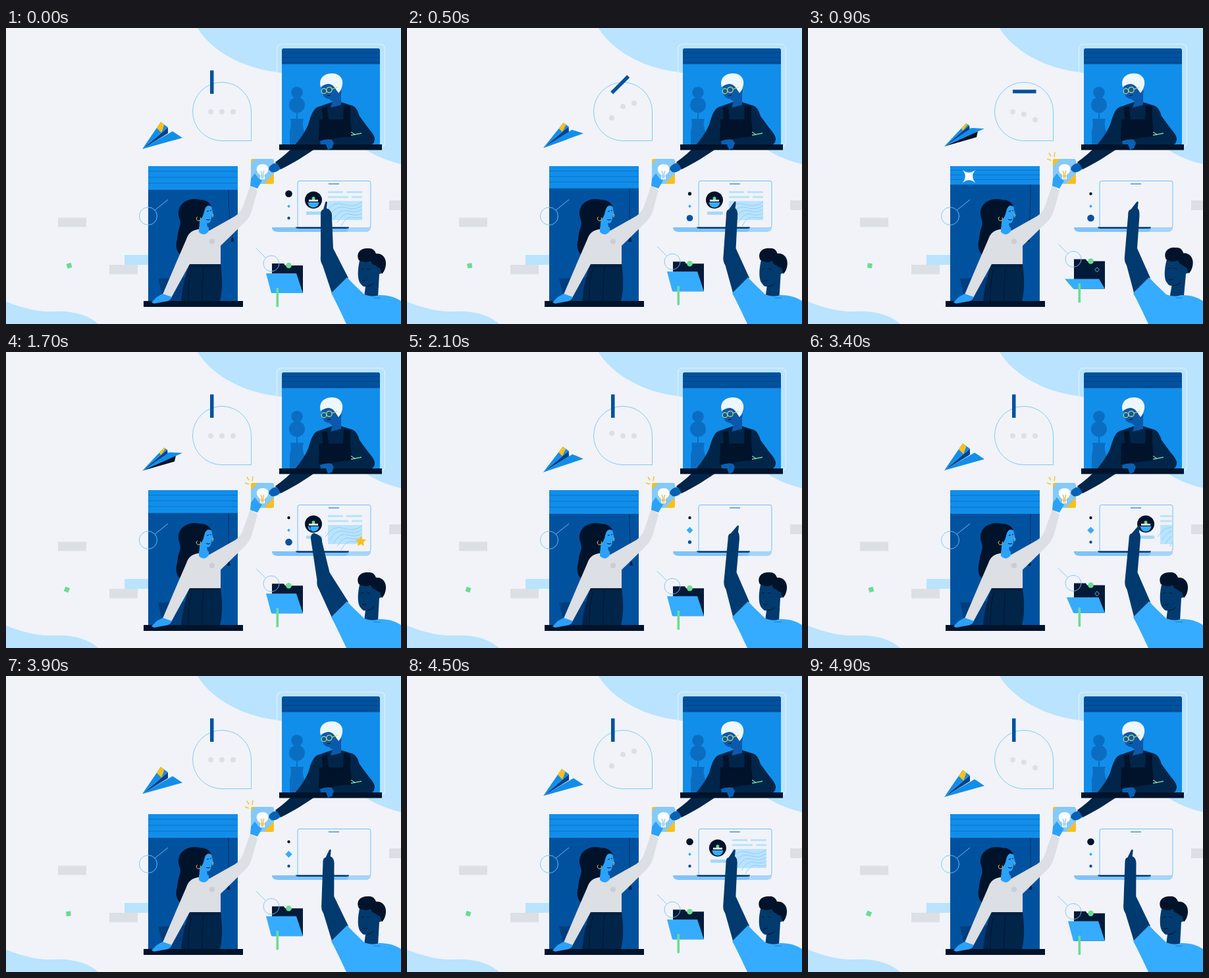
An HTML page that plays this animation: 600x450 px, repeating every 5000 ms.

```html
<!DOCTYPE html>
<html lang="en">
<head>
<meta charset="utf-8">
<title>Ideas from window to window</title>
<style>
html, body { margin: 0; width: 100%; height: 100%; overflow: hidden; background: #f1f3f8; }
svg { display: block; width: 100vw; height: 100vh; }
.sky { fill: #b9e3fe } .grey { fill: #dcdfe3 } .blue { fill: #118eea } .deep { fill: #00529f }
.skin { fill: #2ba1fa } .dark { fill: #003a6e } .navy { fill: #002549 } .ink { fill: #00132a }
.shirt { fill: #35acff } .hand { fill: #0861b5 } .green { fill: #6bdc93 } .gold { fill: #fcbf1c } .white { fill: #fff }
.line { fill: none; stroke: #78c3f3; stroke-width: .9 }
.seam { fill: none; stroke: #00152d; stroke-width: 1 }
</style>
</head>
<body>
<svg viewBox="0 0 600 450">
  <defs><clipPath id="screen"><rect x="444" y="234" width="109.5" height="68.5"/></clipPath></defs>
  <rect width="600" height="450" fill="#f1f3f8"/>
  <path class="sky" d="M291 0C310 32 355 60 411 67C480 76 500 160 555 190Q575 201 600 207V0ZM0 416C20 424 45 432 70 431C100 429 125 436 140 450H0Z"/>
  <path class="grey" d="M79 288.5h43v14H79ZM157 360h43v14.5h-43ZM582 262h18v15h-18Z"/>
  <rect class="sky" x="180" y="345" width="36" height="15"/>
  <rect class="green" id="chip" x="-3.6" y="-3.6" width="7.2" height="7.2"/>

  <!-- speech bubble -->
  <path class="line" d="M328 82.5A44.5 44.5 0 0 0 328 171.5H372.5V127A44.5 44.5 0 0 0 328 82.5Z"/>
  <rect class="deep" id="bar" x="310" y="64.5" width="5.5" height="35.5"/>
  <g class="grey" id="dots"><circle cx="311" r="4"/><circle cx="328" r="4"/><circle cx="345" r="4"/></g>
  <g id="plane"><polygon class="ink"/><polygon fill="#00428a"/><polygon class="blue"/><polygon class="gold"/><polygon class="blue"/></g>

  <!-- upper window -->
  <rect x="411.5" y="24.5" width="164" height="156.5" rx="7" fill="none" stroke="#e0f2ff" stroke-width="1.2"/>
  <rect class="blue" x="419" y="31" width="149" height="148" rx="4"/>
  <path class="deep" d="M419 55V34Q419 31 422 31H565Q568 31 568 34V55Z"/>
  <path id="slats" stroke="#003f82" stroke-width=".8"/>
  <g fill="#0b6dc2"><circle cx="442" cy="98" r="8.8"/><circle cx="442" cy="117" r="12"/>
    <path d="M441 125h2v14h-2ZM432 138H452Q449 146 453 157V178H431V157Q434 146 432 138Z"/></g>
  <path class="navy" d="M477 119L494 113H510L526 118Q533 120 537 134L551 153Q561 164 560 170Q559 178 550 179H476C455 194 437 205 417 215L409 204C432 188 450 168 459 147C464 130 467 121 477 119Z"/>
  <path class="ink" d="M480 121L488 120L490 139H512L513 117L523 118V139L526 165Q505 166 484 171H475L476 139H481Z"/>
  <path fill="#0a59aa" d="M480 86C479 98 481 107 491 108L496 112L493 121L509 117V100C512 90 505 79 495 82Z"/>
  <path fill="#edf7fd" d="M478 90C474 77 483 69 495 69C508 69 514 79 510 90Q509 95 505 99L501 93Q497 86 491 85Q484 85 478 90Z"/>
  <g fill="none" stroke="#c9dc63" stroke-width="1.2"><circle cx="483" cy="96" r="3.8"/><circle cx="491" cy="94" r="4.2"/><path d="M495 93L504 90"/></g>
  <path class="seam" d="M488 103l5-1"/>
  <path d="M524 163L540 160" stroke="#60dd91" stroke-width="1.3"/>
  <path d="M524 158l6 4" stroke="#d9f1ff"/>
  <path class="ink" d="M415 177H571V185.5H415Z"/>
  <path class="hand" d="M477 172Q486 168 495 170L498 175L495 183L489 185L486 177H478Z"/>

  <!-- lower window -->
  <rect class="deep" x="216" y="210" width="136" height="206"/>
  <path id="cord" fill="none" stroke="#002f63" stroke-width="1"/>
  <path id="weight" class="navy" d="M-1.5 -3H1.5L2.5 3H-2.5Z"/>
  <rect class="blue" id="blind" x="216" y="210" width="136"/>
  <path id="folds" stroke="#0a6dc0" stroke-width=".8"/>
  <path class="white" id="spark" d="M0 -14Q1 -1 14 0Q1 1 0 14Q-1 1 -14 0Q-1 -1 0 -14Z"/>
  <path fill="#003d7d" d="M231 381L273 379L266 415H239Z"/>
  <path class="ink" d="M294 261C283 258 264 262 262 280C261 288 267 293 264 302C260 312 261 318 259 325C257 338 263 346 270 347C280 340 276 327 282 315C291 311 298 302 299 290L306 268Z"/>
  <path class="skin" d="M300 267L312 270Q313 277 315 284L312 287Q312 297 305 297L308 310H293L295 282Z"/>
  <path class="ink" d="M288 263Q305 257 313 272Q304 266 301 279Q299 289 293 293L283 280Z"/>
  <path class="seam" d="M305 279l3-1M310 278l2-1M304 291q3 2 6 0"/>
  <g fill="none" stroke="#e3cf5a" stroke-width="1"><path d="M291 287a3.2 3.2 0 1 0 4 1"/><path d="M314 283q2 3-1 5"/></g>
  <path class="navy" d="M279 358H326C329 380 329 400 325 415H266C268 395 272 375 279 358Z"/>
  <path class="seam" d="M278 362H326M300 363Q297 390 298 415M282 366Q276 390 277 415"/>
  <path class="grey" d="M292 306Q278 308 274 321L258 358L238 405L251 410L279 359H326V331L363 295Q371 287 374 276L382 247L371 239L360 271Q357 280 348 286L309 308Z"/>
  <path class="skin" d="M293 303Q301 301 308 303V309Q301 318 293 310Z"/>
  <circle cx="313" cy="324.5" r="4" fill="#c9cdd4"/>
  <path class="ink" d="M209 415H360V424H209Z"/>
  <path class="skin" d="M238 404L252 409Q249 416 241 416L225 419L221 417L229 409Z"/>
  <circle class="line" cx="216" cy="286" r="13.5"/>
  <path class="line" d="M226 277L246 261"/>

  <!-- card with the idea -->
  <rect x="372" y="199" width="35" height="38" rx="3" fill="#84caf9"/>
  <path class="gold" d="M407 221V234Q407 237 404 237H392Z"/>
  <path class="gold" id="corner"/>
  <path class="white" d="M390 207C378 207 379 219 386 223V230H393V223C401 219 401 207 390 207Z"/>
  <path id="base" fill="none" stroke-width="1.2" d="M387 217L388.5 221V229M392 217L390.5 221V229M386 225H394"/>
  <path class="skin" d="M372 229L378 221L384 229L389 232L382 244L371 240Z"/>
  <path class="hand" d="M400 211Q407 204 412 206L417 214Q410 221 403 219L399 215Z"/>
  <path id="rays" d="M366 190l3 5M375 189l-1 7M363 199l6 2" stroke="#f4c23a" stroke-width="1.5"/>

  <!-- folder -->
  <g id="folder">
    <path fill="#001a38" d="M404 358H422L424 361H451V403H404Z"/>
    <path class="line" id="tag" d="M439 370.5l3.5 3.5l-3.5 3.5l-3.5-3.5Z"/>
    <polygon class="shirt" id="flap"/>
    <circle class="green" cx="429.5" cy="361" r="4.3"/>
    <rect class="green" x="410.5" y="395" width="3.6" height="29"/>
    <circle class="line" cx="403" cy="358" r="12"/>
    <path class="line" d="M380 335L394 349"/>
  </g>

  <!-- laptop -->
  <circle class="ink" id="top" cx="429.5" cy="252"/>
  <path class="shirt" id="mid" d="M0 -1L1 0L0 1L-1 0Z"/>
  <circle class="deep" id="low" cx="429.5" cy="289"/>
  <rect x="443" y="232.5" width="111" height="71" rx="3" fill="#f1f3f8" stroke="#6fbff5"/>
  <path d="M490 237H506" stroke="#2d79c4" stroke-width="1.2"/>
  <g clip-path="url(#screen)"><g id="page">
    <circle class="ink" cx="467" cy="261.5" r="13"/>
    <path class="shirt" d="M458.5 265H475.5Q474 273 467 273Q460 273 458.5 265Z"/>
    <circle class="green" cx="467" cy="259" r="2.5"/>
    <path class="white" d="M460 261h14v2.8h-14Z"/>
    <rect x="456" y="279" width="24" height="5" rx="1.5" fill="#a5d8fc"/>
    <path class="sky" d="M489 248h23v3h-23ZM517 248h24v3h-24ZM489 255.5h31v3h-31ZM525 255.5h16v3h-16ZM489 263h52v29h-52Z"/>
    <path id="contours" fill="none" stroke="#8ccbf8" stroke-width=".9"/>
    <polygon class="gold" id="star"/>
  </g></g>
  <path d="M404 303H554Q554 310 545 310H413Q404 310 404 303Z" fill="#80c3fa"/>
  <path d="M521 303H554Q554 310 545 310H516Q521 309 521 303Z" fill="#a5d5fc"/>
  <path class="dark" d="M440 302.5H521Q521 305 517 305H445Q440 305 440 302.5Z"/>

  <!-- swiping man -->
  <path class="dark" id="arm"/>
  <g id="head">
    <path class="dark" d="M540 350C536 365 535 383 541 389Q544 394 548 393L546 409H567L569 374Q575 373 574 366L568 345Z"/>
    <path class="ink" d="M538 353C533 343 540 334 552 335Q561 334 564 343C574 342 580 350 579 360Q578 369 573 374L570 365Q566 364 563 361Q558 360 556 354Q548 359 538 353Z"/>
    <path class="seam" d="M541 367l4-1M550 366l5 1M543 384q4 1 7-1M550 393q7-1 11-5"/>
  </g>
  <path class="shirt" d="M494 403L518 379C528 390 537 398 544 405Q556 410 567 406C580 406 591 409 600 415V450H517C510 435 502 418 494 403Z"/>
  <path d="M558 410.5H569" stroke="#1186dd" stroke-width="1"/>
</svg>
<script>
const $ = id => document.getElementById(id);
const set = (id, name, v) => $(id).setAttribute(name, v);
const move = (id, v) => set(id, 'transform', v);
const clamp = x => Math.max(0, Math.min(1, x));
const wave = (t, period) => Math.cos(2 * Math.PI * t / period);
// Eased step from 0 to 1 between times a and b, and a bump made of two steps
const ramp = (t, a, b) => (1 - Math.cos(Math.PI * clamp((t - a) / (b - a)))) / 2;
const bump = (t, a, b, c, d) => ramp(t, a, b) - ramp(t, c, d);
const mix = (a, b, k) => a.map((v, i) => v + (b[i] - v) * k);
const range = (n, f) => Array.from({ length: n }, (_, i) => f(i));

set('star', 'points', range(10, i => {
  const a = i * Math.PI / 5, r = i % 2 ? 4.2 : 8.5;
  return [r * Math.sin(a), -r * Math.cos(a)];
}).join(' '));
set('slats', 'd', range(3, i => `M419 ${37 + 7.5 * i}H568`).join(''));
set('contours', 'd', range(5, i =>
  `M${485 + 6 * i} ${281 + 5 * i}Q${497 + 5 * i} ${262 + 6 * i} ${513 + 3 * i} ${268 + 5 * i}T541 ${264 + 6 * i}`).join(''));

function drawPlane(roll) {
  const nose = [207, 184], left = [235 + 5 * roll, 143 + 6 * roll], ridge = [246 - roll, 151 + roll];
  const inner = [253 - 5 * roll, 157 - roll], right = [268, 167 - 10 * roll];
  const parts = [
    [nose, [247 + 11 * roll, 161], [230 + 26 * roll, 172 - 2 * roll]],
    [nose, ridge, [246, 160], [225, 173]],
    [nose, left, ridge],
    [mix(nose, left, .78), left, mix(left, ridge, .5), mix(nose, ridge, .75)],
    [nose, inner, right],
  ];
  [...$('plane').children].forEach((part, i) => part.setAttribute('points', parts[i].join(' ')));
}

// Forearm from a fixed sleeve to a fingertip at x
function drawArm(x) {
  const h = 485 + (x - 487) * .6, e = 478 + (x - 487) * .22;
  set('arm', 'd', `M${h - 7} 284Q${h - 7} 276 ${h - 3} 276L${x - 2} 265Q${x} 262 ${x + 1} 265L${x} 274` +
    `Q${h + 11} 277 ${h + 10} 288L${e + 19} 335L520 380L496 406L${e + 3} 361Q${e - 1} 355 ${e} 347Z`);
}

function draw(t) {
  const p = t % 1000, first = t < 1000;

  move('bar', `rotate(${90 * bump(t, 300, 700, 950, 1250)} 313.6 97.4)`);
  [...$('dots').children].forEach((dot, i) => {
    const q = t % 2000 - i * 133;
    dot.setAttribute('cy', 127.5 - 14 * bump(q, 0, 275, 275, 575) + 13.3 * bump(q, 275, 575, 575, 870));
  });
  const sway = wave(t, 3300);
  move('chip', `translate(${94.2 + 1.8 * sway} 361.3) rotate(${4 - 20 * sway})`);

  const bob = (wave(t, 2500) - 1) / 2;
  move('plane', `translate(0 ${5 * bob})`);
  drawPlane(bump(t, 300, 700, 1800, 2300));

  const open = bump(t, 500, 800, 1000, 1400) + .75 * bump(t, 2100, 2600, 3200, 3650);
  const edge = 373 + 15 * open;
  move('folder', `translate(0 ${8 * bob})`);
  set('flap', 'points', `${395 - 5 * open},${edge} ${441 + open},${edge} 451,403 403,403`);
  set('tag', 'opacity', open > .3 ? 1 : 0);

  const drop = 36 - 8 * bump(t, 300, 850, 850, 2000);
  set('blind', 'height', drop);
  set('folds', 'd', range(3, i => `M216 ${210 + drop * (.22 + .25 * i)}H352`).join(''));
  const end = 338 + 6 * wave(t, 2200) * Math.exp(-t / 2600);
  set('cord', 'd', `M338 ${210 + drop}Q338 285 ${end} 319`);
  move('weight', `translate(${end} 322)`);
  move('spark', `translate(244.5 225.5) rotate(45) scale(${bump(t, 600, 900, 900, 1200)})`);

  const lit = t >= 700 && t < 4000;
  const c = 6 + 5 * bump(t, 400, 850, 850, 4000);
  set('corner', 'd', `M372 ${199 + c}V202Q372 199 375 199H${372 + c}Z`);
  set('base', 'stroke', lit ? '#f1ae2c' : '#8bc6ee');
  set('rays', 'opacity', lit ? 1 : 0);

  // Page marks: top, then low, then mid, then top again
  const low = bump(t, 350, 550, 1950, 2150), mid = bump(t, 1950, 2150, 3900, 4100);
  set('top', 'r', 5.3 - 3.1 * clamp(low + mid));
  set('low', 'r', 2.2 + 3.1 * low);
  move('mid', `translate(429.5 271) scale(${2.4 + 2.9 * mid})`);

  // Each page slides in from the right, then leaves to the left
  const enter = first ? 0 : 105 * (1 - clamp((p - 340) / 250)) ** 3;
  const leave = 110 * clamp((p - (first ? 600 : 700)) / 180) ** 2;
  move('page', `translate(${enter - leave})`);
  move('star', `translate(539 288) scale(${first ? 0 : ramp(p, 530, 640)})`);

  const nod = bump(t, 400, 900, 900, 1400);
  drawArm(503 - 41 * bump(p, 440, 700, 700, 1000) + 8 * nod - 16 * (1 - ramp(t, 0, 400)));
  move('head', `translate(${6 * nod - 2} ${-nod}) rotate(${2 * nod} 556 405)`);
}

function tick() {
  draw(Math.floor(performance.now() % 5000 / 100) * 100);
  requestAnimationFrame(tick);
}
tick();
</script>
</body>
</html>
```
